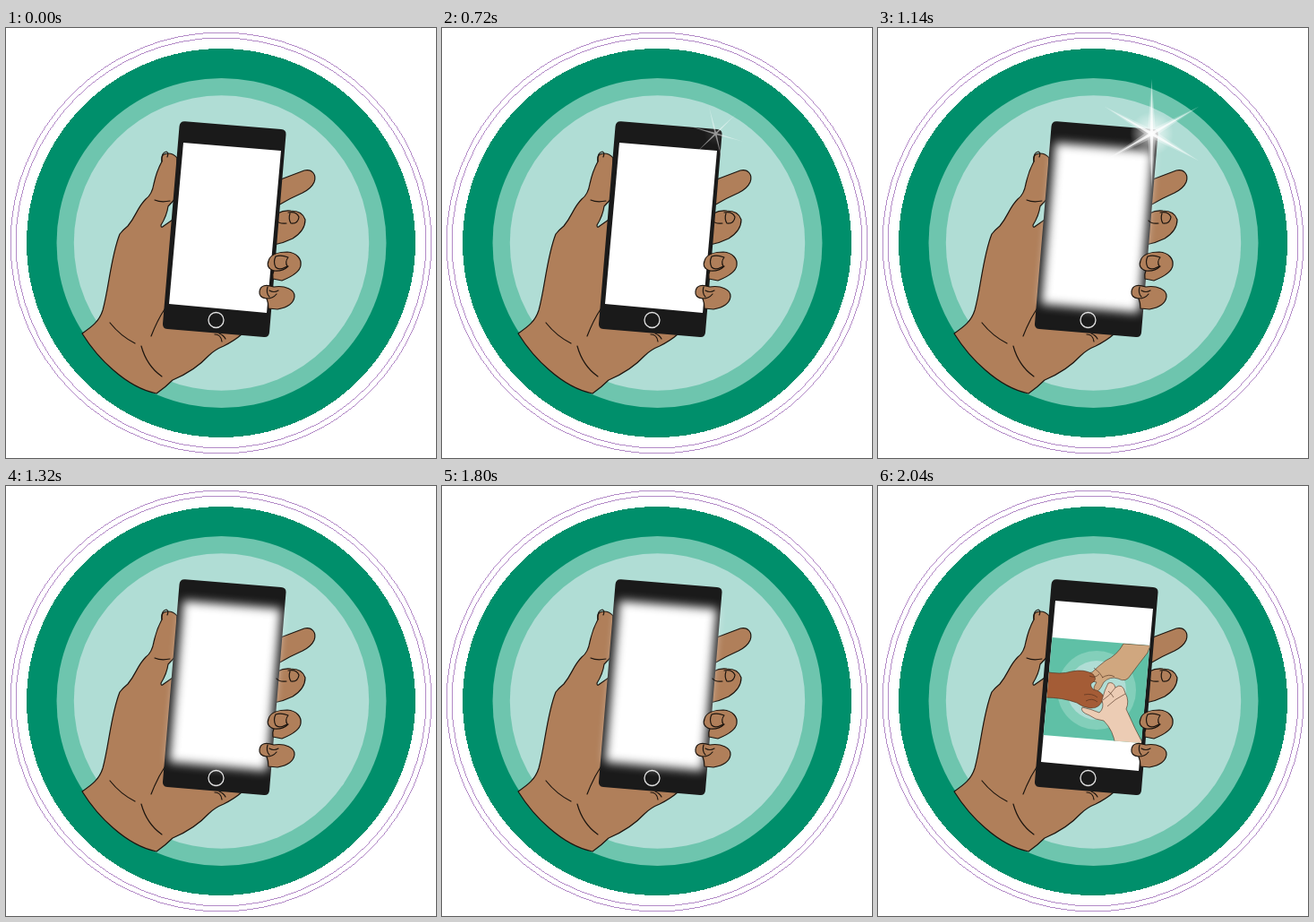
Animation, 480 px wide and 480 px high, one loop 2400 ms. Source, as an HTML page:

```html
<!DOCTYPE html>
<html lang="en">
<head>
<meta charset="utf-8">
<title>Phone in hand</title>
<style>
  html, body { margin: 0; width: 100%; height: 100%; overflow: hidden; background: #fff; }
  svg { display: block; width: 100vw; height: 100vh; }
  .crisp { shape-rendering: crispEdges; }
  .skin { fill: #b07f5a; stroke: #1c150f; stroke-width: 1.2; stroke-linejoin: round; stroke-linecap: round; }
  .line { fill: none; stroke: #1c150f; stroke-width: 1.2; stroke-linejoin: round; stroke-linecap: round; }
  .mini { stroke: #4a2d1c; stroke-width: .6; stroke-linejoin: round; }
</style>
</head>
<body>
<svg viewBox="0 0 480 480">
  <defs>
    <filter id="soft" filterUnits="userSpaceOnUse" x="150" y="90" width="190" height="270" color-interpolation-filters="sRGB">
      <feGaussianBlur id="softBlur" stdDeviation="0"/>
    </filter>
    <clipPath id="screenClip"><path d="M198 128 307 137 291 318 182 308Z"/></clipPath>
    <clipPath id="bandClip"><path d="M194.4 169 303.4 178 294 287 184.6 278Z"/></clipPath>
    <radialGradient id="rayFill" gradientUnits="userSpaceOnUse" cx="0" cy="0" r="60">
      <stop offset="0" stop-color="#fff"/>
      <stop offset=".5" stop-color="#fff" stop-opacity=".85"/>
      <stop offset="1" stop-color="#fff" stop-opacity=".35"/>
    </radialGradient>
    <radialGradient id="coreFill">
      <stop offset="0" stop-color="#fff"/>
      <stop offset=".3" stop-color="#fff" stop-opacity=".6"/>
      <stop offset="1" stop-color="#fff" stop-opacity="0"/>
    </radialGradient>
  </defs>

  <rect width="480" height="480" fill="#fff"/>
  <g class="crisp" fill="none" stroke="#9a63b5" stroke-width=".75">
    <circle cx="240" cy="240" r="235"/>
    <circle cx="240" cy="240" r="229"/>
  </g>
  <circle class="crisp" cx="240" cy="240" r="217" fill="#008f6b"/>
  <circle cx="240.5" cy="240" r="184" fill="#6ec5ae"/>
  <circle cx="240.5" cy="240" r="164.7" fill="#b0ddd5"/>

  <!-- palm, thumb and index finger -->
  <path class="skin" d="M85 341 C95 334 104 328 108 315 C115 290 117 255 127 230 Q130 226 136 221
    C146 209 146 201 156 191 Q163 186 165 174 Q168 160 174 149 C173 142 176 140 181 140
    Q187 140 191 145 L191 188 Q186 194 181 199 C180 206 178 212 173 220 Q173 224 176 221 L186 214
    L200 330 L263 342 Q255 349 243 355 Q233 359 226 366 C215 378 200 387 186 393 Q178 401 168 408
    Q144 403 120 382 Q100 365 85 341Z"/>
  <path class="line" d="M174 149 Q173 139 179 138 Q182 139 180 144 M166 192 Q173 195 183 193
    M116 329 Q128 344 144 352 M151 355 Q157 377 174 389 M162 344 Q169 326 177 314
    M233 342 Q240 342 241 350 M238 341 Q243 343 245 347"/>
  <path class="skin" d="M304 170 Q320 164 333 159 C342 157 347 164 344 172 Q341 179 331 184 Q317 190 302 199Z"/>
  <path class="skin" d="M303 207 Q310 203 318 204 Q331 204 334 214 C334 224 328 230 320 235 Q310 240 299 242Z"/>

  <path d="M200 104.3 307 113 Q313 113.5 312.5 119 L294 340 Q293.400 345.500 288 345 L180 336 Q174.500 335.500 175 330 L193.500 110 Q194 103.800 200 104.300Z" fill="#1a1a1a"/>
  <circle cx="234.500" cy="326" r="8.500" fill="none" stroke="#e2e2e2" stroke-width="1.300"/>

  <g filter="url(#soft)" id="screen">
    <path d="M198 128 307 137 291 318 182 308Z" fill="#fff"/>
    <g id="picture" clip-path="url(#bandClip)" opacity="0">
      <path d="M190 165H310V290H180Z" fill="#5fc0a6"/>
      <circle cx="244" cy="228" r="44" fill="#83cfba"/>
      <circle cx="244" cy="228" r="33" fill="#b0ddd5"/>
      <g class="mini">
        <path fill="#d0a77f" d="M274 176 L304 178 L301 186 Q290 200 282 211 Q277 220 268 215
          Q259 212 252 219 Q246 232 241 230 Q240 224 244 219 Q235 218 231 211 Q233 208 239 208
          Q246 201 254 195 Q267 189 274 176Z"/>
        <path fill="#a45c36" d="M185 207 Q204 211 216 207 Q230 204 240 210 Q245 216 240 219
          Q235 221 240 227 Q250 229 252 236 Q248 249 237 248 Q228 247 222 242 Q206 236 185 236Z"/>
        <path fill="#ecccb4" d="M265 290 Q263 273 252 262 Q242 261 236 256 Q225 252 228 247
          Q238 249 247 253 Q253 248 250 239 Q253 227 257 220 Q263 218 265 225 Q273 219 276 231
          Q281 240 277 249 Q286 270 298 292Z"/>
        <path fill="none" d="M236 212 Q242 215 247 210 M241 203 Q248 208 251 214 M250 214 Q258 209 264 213
          M230 233 Q239 231 245 236 M232 240 Q239 236 245 241 M251 239 Q259 234 265 225
          M256 246 Q264 238 276 232 M257 229 Q261 232 263 236"/>
      </g>
    </g>
  </g>

  <!-- fingertips in front of the phone -->
  <path class="skin" d="M293 260 C295 252 306 250 314 250 C325 251 330 258 329 265 C328 273 318 278 308 282 L298 280 Q297 275 299 271 Q290 268 293 260Z"/>
  <path class="skin" d="M283 294 C284 287 290 286 299 289 C311 287 323 292 322 300 C321 308 314 312 303 314 L293 313 Q293 307 291 302 Q282 301 283 294Z"/>
  <path class="line" d="M302 215 Q305 219 313 218 M315 206 Q324 204 327 211 Q326 219 318 218 Q315 213 317 207
    M299 271 Q309 272 315 266 M301 255 Q307 253 315 256 Q311 261 314 266 Q305 271 301 267 Q298 261 301 255
    M291 302 Q298 302 302 297 M292 289 Q290 296 294 300 M294 293 Q299 296 304 293"/>

  <g id="star" opacity="0">
    <path id="rays" fill="url(#rayFill)"/>
    <path id="haze" fill="url(#rayFill)" opacity="0"/>
    <circle id="core" r="24" fill="url(#coreFill)"/>
  </g>
</svg>
<script>
  const LOOP = 2400, STEP = 60, MAX_BLUR = 5.5;
  const el = id => document.getElementById(id);
  const set = (id, attrs) => Object.entries(attrs).forEach(([k, v]) => el(id).setAttribute(k, v));
  const ramp = (t, from, to) => Math.min(1, Math.max(0, (t - from) / (to - from)));

  function starPath(outer, inner) {
    const points = Array.from({ length: 12 }, (_, i) => {
      const r = i % 2 ? inner : outer, a = i * Math.PI / 6;
      return `${(r * Math.sin(a)).toFixed(2)} ${(-r * Math.cos(a)).toFixed(2)}`;
    });
    return `M${points.join("L")}Z`;
  }
  set("rays", { d: starPath(60, 3.2) });
  set("haze", { d: starPath(60, 8) });

  function drawStar(t) {
    const size = 0.068 * (t - 240) / 60;
    const angle = (t - 1140) / 30;
    const flare = ramp(t, 960, 1140);
    const alpha = t < 240 ? 0 : ramp(t, 300, 960) * (1 - ramp(t, 1140, 1260));
    set("star", {
      transform: `translate(305.5 118) rotate(${angle}) scale(${Math.max(size, 0.01)})`,
      opacity: alpha
    });
    set("rays", { opacity: 0.85 });
    set("haze", { opacity: 0.35 * flare });
    set("core", { opacity: 0.2 + 0.8 * flare });
  }

  function draw(time) {
    const t = Math.floor((time % LOOP) / STEP) * STEP;
    const reveal = ramp(t, 1800, 2040);
    const blur = MAX_BLUR * ramp(t, 960, 1140) * (1 - reveal);
    set("softBlur", { stdDeviation: blur });
    if (blur) set("screen", { filter: "url(#soft)" });
    else el("screen").removeAttribute("filter");
    set("picture", { opacity: reveal });
    drawStar(t);
  }

  const start = performance.now();
  function tick() {
    draw(performance.now() - start);
    requestAnimationFrame(tick);
  }
  tick();
</script>
</body>
</html>
```
